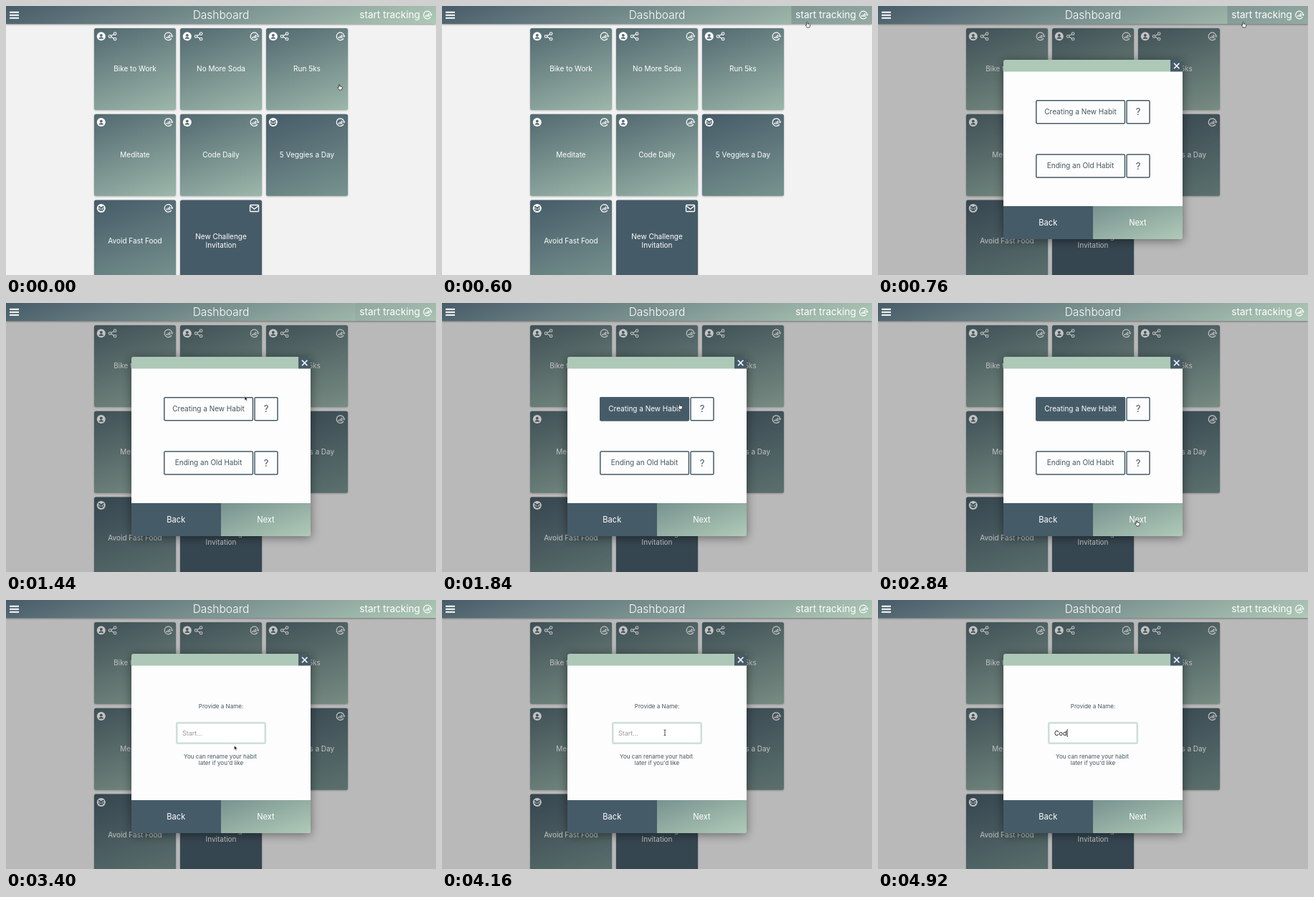
These frames come from a looping animation (600x375 px, 5040 ms). An HTML page:

```html
<!DOCTYPE html>
<html lang="en">
<head>
<meta charset="utf-8">
<title>Dashboard</title>
<style>
  html, body { margin: 0; width: 100%; height: 100%; overflow: hidden; background: #f2f2f2; }
  svg { display: block; width: 600px; height: 375px; }
  text { font: 10px Inter, "Open Sans", sans-serif; fill: #fff; text-anchor: middle; }
  .dark { fill: #43565f; }
  .small { font-size: 8.05px; }
  .big { font-size: 11.1px; }
  .entry { font-size: 9px; text-anchor: start; }
  .box { fill: #fdfdfd; stroke: #465b68; stroke-width: 1.5; }
</style>
</head>
<body>
<svg viewBox="0 0 600 375">
  <defs>
    <linearGradient id="light" x1=".28" y1="-.1" x2=".72" y2="1.1">
      <stop stop-color="#526970"/><stop offset="1" stop-color="#9cb7aa"/>
    </linearGradient>
    <linearGradient id="deep" x1=".28" y1="-.1" x2=".72" y2="1.1">
      <stop stop-color="#465b68"/><stop offset="1" stop-color="#78938f"/>
    </linearGradient>
    <linearGradient id="bar" gradientUnits="userSpaceOnUse" x1="261" y1="-95" x2="339" y2="120">
      <stop stop-color="#465b68"/><stop offset="1" stop-color="#b0cab8"/>
    </linearGradient>
    <linearGradient id="go" gradientUnits="userSpaceOnUse" x1="348" y1="262" x2="377" y2="342">
      <stop stop-color="#78938f"/><stop offset="1" stop-color="#b0cab8"/>
    </linearGradient>
    <filter id="soft" x="-20%" y="-20%" width="140%" height="140%"><feGaussianBlur stdDeviation="7"/></filter>
    <filter id="thin" x="-2%" y="-50%" width="104%" height="200%"><feGaussianBlur stdDeviation="1.3"/></filter>

    <g id="user">
      <circle r="6" fill="#fff"/>
      <path d="M-3.2 3.4Q-3 .9 0 .9T3.2 3.4Z" fill="#526970"/>
      <circle cy="-1.5" r="1.9" fill="#526970"/>
    </g>
    <g id="group">
      <circle r="6" fill="#fff"/>
      <g fill="#4a606b">
        <circle cx="-2.6" cy="-1.8" r="1.3"/><circle cx="2.6" cy="-1.8" r="1.3"/><circle cy="-.6" r="1.6"/>
        <path d="M-4.6 1.6Q-4.3-.2-2.4 0L-1.6 1.4-2.8 2.2ZM4.6 1.6Q4.3-.2 2.4 0L1.6 1.4 2.8 2.2ZM-2.8 3.8Q-2.5 1.4 0 1.4T2.8 3.8Z"/>
      </g>
    </g>
    <g id="share" fill="none" stroke="#fff" stroke-width="1.1">
      <path d="M-1.8-.8 2-2.9M-1.8.8 2 2.9"/>
      <circle cx="-3.4" r="1.8"/><circle cx="3.6" cy="-3.7" r="1.8"/><circle cx="3.6" cy="3.7" r="1.8"/>
    </g>
    <g id="stats" fill="#fff">
      <path d="M4.5 2.8A5.3 5.3 0 1 1 5.2-1" fill="none" stroke="#fff" stroke-width="1.2"/>
      <path d="M3.3-.9H7.1L5.2 1.4Z"/>
      <path d="M-2.9.6h1.4v2h-1.4ZM-.8-.8H.6V2.6H-.8ZM1.3-2.4H2.7V2.6H1.3Z"/>
    </g>
    <g id="mail" fill="none" stroke="#fff" stroke-width="1.3">
      <rect x="-6" y="-4.4" width="12" height="9" rx="1"/><path d="M-5.6-3.2 0 1.2 5.6-3.2"/>
    </g>
  </defs>

  <rect width="600" height="375" fill="#f2f2f2"/>
  <g id="tiles"></g>
  <rect id="shade" y="25" width="600" height="350" opacity=".235"/>

  <rect width="600" height="26" fill="#000" opacity=".4" filter="url(#thin)"/>
  <rect width="600" height="25" fill="url(#bar)"/>
  <rect id="hover" x="487.5" width="112.5" height="25" fill="#465b68"/>
  <path d="M5 8.8H18M5 12.8H18M5 16.8H18" stroke="#fff" stroke-width="2"/>
  <text x="300" y="17.6" style="font-size:15.5px;font-weight:300">Dashboard</text>
  <text x="535.5" y="17" style="font-size:13.5px">start tracking</text>
  <use href="#stats" x="588" y="12.5"/>

  <g id="modal">
    <rect x="175" y="77" width="250" height="250" opacity=".45" filter="url(#soft)"/>
    <rect x="175" y="75" width="250" height="250" rx="3" fill="#adc8b7"/>
    <path d="M408 75h14q3 0 3 3v14h-17Z" fill="#465b68"/>
    <path d="M413 79.8 420.4 87.2M420.4 79.8 413 87.2" stroke="#fff" stroke-width="1.6"/>
    <rect x="175" y="91.5" width="250" height="188" fill="#fdfdfd"/>
    <path d="M175 279H300V325H178q-3 0-3-3Z" fill="#465b68"/>
    <path d="M300 279H425V322q0 3-3 3H300Z" fill="url(#go)"/>
    <text class="big" x="237.3" y="305.7">Back</text>
    <text class="big" x="362.5" y="305.7">Next</text>

    <g id="choose">
      <rect class="box" x="220.8" y="131.8" width="123.6" height="32" rx="1.5"/>
      <rect id="picked" x="220" y="131" width="125" height="33.5" rx="2" fill="#465b68"/>
      <rect class="box" x="347" y="131.8" width="32" height="32" rx="1.5"/>
      <rect class="box" x="220.8" y="207" width="123.6" height="32" rx="1.5"/>
      <rect class="box" x="347" y="207" width="32" height="32" rx="1.5"/>
      <text class="dark" id="create" x="282.5" y="151.2">Creating a New Habit</text>
      <text class="dark" x="282.5" y="226.4">Ending an Old Habit</text>
      <text class="dark" x="363" y="152.4" style="font-size:13px">?</text>
      <text class="dark" x="363" y="227.6" style="font-size:13px">?</text>
    </g>

    <g id="naming">
      <text class="dark small" x="300" y="150.6">Provide a Name:</text>
      <rect x="238.5" y="171.5" width="123" height="28" rx="1" fill="#fff" stroke="#e3eeea" stroke-width="3"/>
      <rect x="238" y="171" width="124" height="29" rx="1.5" fill="none" stroke="#b9d0c8"/>
      <text class="entry" id="entry" x="246" y="188.6"></text>
      <rect id="caret" y="180" width=".8" height="11" fill="#111"/>
      <text class="dark small" x="299" y="221.3">You can rename your habit</text>
      <text class="dark small" x="300" y="229.6">later if you'd like</text>
    </g>
  </g>

  <g id="cursor">
    <path id="arrow" d="M0 0V5.8L1.4 4.6 2.3 6.7 3.3 6.2 2.4 4.2H4.2Z" stroke="#fff" stroke-width=".5"/>
    <path id="hand" d="M-.8.8Q0-.4.7.8V3Q3.8 2.8 4.2 4.2 4.3 6.4 3.1 8H0Q-1.2 6.6-2.4 4.6-2 3.6-.8 4.7Z" fill="#fff" stroke="#222" stroke-width=".8"/>
    <path id="beam" d="M-1.5-4Q0-4 0-3 0-4 1.5-4M0-3V3M-1.5 4Q0 4 0 3 0 4 1.5 4" fill="none" stroke="#222" stroke-width=".8"/>
  </g>
</svg>
<script>
const $ = id => document.getElementById(id);
const LOOP = 5040, STEP = 40;

// label lines, fill, left icons, right icon
const tiles = [
  ["Bike to Work", "url(#light)", "user share", "stats"],
  ["No More Soda", "url(#light)", "user share", "stats"],
  ["Run 5ks", "url(#light)", "user share", "stats"],
  ["Meditate", "url(#light)", "user", "stats"],
  ["Code Daily", "url(#light)", "user", "stats"],
  ["5 Veggies a Day", "url(#deep)", "group", "stats"],
  ["Avoid Fast Food", "url(#deep)", "group", "stats"],
  ["New Challenge|Invitation", "#465b68", "", "mail"],
];
const icon = (name, x, y) => `<use href="#${name}" x="${x}" y="${y}"/>`;
$("tiles").innerHTML = tiles.map(([label, fill, left, right], i) => {
  const x = 123 + i % 3 * 120, y = 31 + Math.floor(i / 3) * 119.8;
  const lines = label.split("|");
  return `<rect x="${x}" y="${y + .6}" width="114" height="114" rx="2.5" opacity=".3" filter="url(#thin)"/>
    <rect x="${x}" y="${y}" width="114" height="114" rx="2.5" fill="${fill}"/>` +
    left.split(" ").filter(Boolean).map((n, k) => icon(n, x + 9.8 + k * 15.7, y + 11.3)).join("") +
    icon(right, x + 103.5, y + 11.3) +
    lines.map((s, k) => `<text x="${x + 57}" y="${y + 60.2 + (k - (lines.length - 1) / 2) * 11.6}">${s}</text>`).join("");
}).join("");

// time, x, y of the pointer tip
const path = [
  [0, 465, 109], [40, 466, 107], [160, 474, 84], [280, 493, 49], [400, 507, 27], [500, 509.5, 22],
  [920, 509.5, 22], [1040, 494, 34], [1200, 437, 74], [1320, 370, 112], [1440, 333, 130],
  [1560, 332, 136], [1960, 331, 142], [2080, 331, 142], [2280, 324.5, 164], [2440, 334, 220],
  [2640, 358, 294], [2760, 361, 303], [3280, 361, 303], [3400, 318.5, 203], [3500, 313, 191], [3680, 311, 185],
];
// value of column c at time t, linear between keys
function along(keys, t, c = 1) {
  const i = keys.findIndex(k => k[0] > t);
  if (i < 0) return keys.at(-1)[c];
  const a = keys[i - 1], b = keys[i];
  return a[c] + (b[c] - a[c]) * (t - a[0]) / (b[0] - a[0]);
}
const hoverKeys = [[0, 0], [360, 0], [520, .27], [960, .27], [1200, .06], [1480, .06], [1640, 0]];
const pickKeys = [[0, 0], [1480, 0], [1680, 1]];
const show = (id, on) => $(id).style.display = on ? "" : "none";

function pointerKind(t, x, y) {
  if (t < 960) return y < 25 || x < 477 ? "hand" : "arrow";
  if (t < 3160) return y > 279 || (t >= 1500 && y > 131 && y < 164.5) ? "hand" : "arrow";
  return y > 279 ? "hand" : y < 199 ? "beam" : "arrow";
}

function draw(t) {
  const open = t >= 760, naming = t >= 3160, typing = t >= 4600;
  show("shade", open);
  show("modal", open);
  show("choose", !naming);
  show("naming", naming);
  $("hover").setAttribute("opacity", along(hoverKeys, t));

  const pick = along(pickKeys, t);
  $("picked").setAttribute("opacity", pick);
  $("create").style.fill = pick > .5 ? "#fff" : "";

  const entry = $("entry");
  entry.textContent = typing ? "Cod".slice(0, t >= 4920 ? 3 : t >= 4800 ? 2 : 1) : "Start...";
  entry.style.fill = typing ? "#111" : "#999";
  show("caret", typing || (t >= 3680 && t < 4160));
  $("caret").setAttribute("x", typing && naming ? 246.3 + entry.getComputedTextLength() : 246);

  const x = along(path, t), y = along(path, t, 2), kind = pointerKind(t, x, y);
  show("cursor", !typing);
  $("cursor").setAttribute("transform", `translate(${x} ${y})`);
  for (const k of ["arrow", "hand", "beam"]) show(k, k === kind);
}

const start = performance.now();
function tick() {
  const t = (performance.now() - start) % LOOP;
  draw(t - t % STEP);
  requestAnimationFrame(tick);
}
tick();
</script>
</body>
</html>
```
